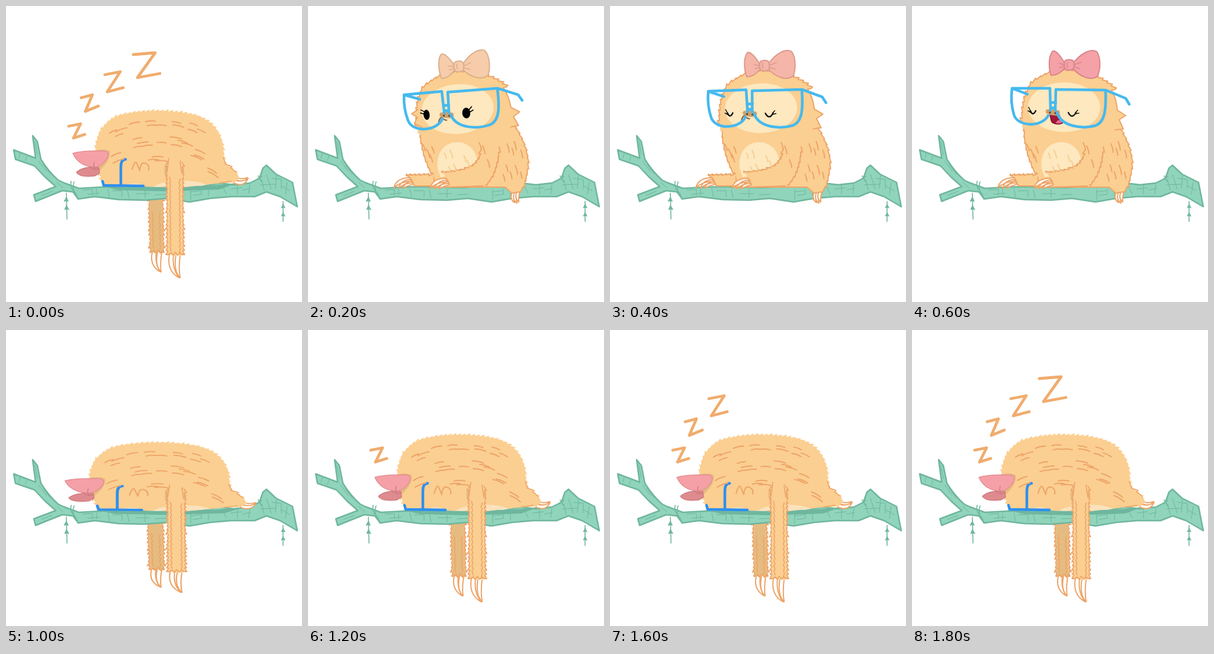
Write an HTML page that moves like this. It is 500 px wide and 500 px high and loops after 2000 ms.

```html
<!DOCTYPE html>
<html lang="en">
<head>
<meta charset="utf-8">
<title>Sleepy sloth</title>
<style>
html, body { margin: 0; width: 100%; height: 100%; overflow: hidden; background: #fff; }
svg { display: block; width: 100vw; height: 100vh; }
</style>
</head>
<body>
<svg id="stage" viewBox="0 0 500 500" stroke-linecap="round" stroke-linejoin="round"></svg>
<script>
const FUR = '#fbcf91', LINE = '#eda468', PALE = '#fde8bf', SHADE = '#e6bb80';
const GREEN = '#8fd4bb', MOSS = '#6fb69e', BLUE = '#45b9ee';

const path = (d, fill = 'none', stroke = 'none', width = 2) =>
  `<path d="${d}" fill="${fill}" stroke="${stroke}" stroke-width="${width}"/>`;
const group = (content, transform) => `<g transform="${transform}">${content}</g>`;
const noise = i => Math.abs(Math.sin(i * 12.9898) * 43758.5453) % 1;

// Turns a smooth path into a furry edge; hair leans along the path.
function fuzz(d, step, size) {
  const curve = document.createElementNS('http://www.w3.org/2000/svg', 'path');
  curve.setAttribute('d', d);
  const count = Math.round(curve.getTotalLength() / step);
  const at = i => curve.getPointAtLength(curve.getTotalLength() * i / count);
  let p = at(0), out = `M${p.x} ${p.y}`;
  for (let i = 1; i <= count; i++) {
    const q = at(i), dx = q.x - p.x, dy = q.y - p.y, len = Math.hypot(dx, dy) || 1;
    const h = size * (.5 + noise(i) * .7) / len;
    out += `L${(q.x + dy * h).toFixed(1)} ${(q.y - dx * h).toFixed(1)}L${q.x.toFixed(1)} ${q.y.toFixed(1)}`;
    p = q;
  }
  return out;
}

// Short strokes centred on "x,y" points, with angle (degrees) given by a rule.
const hairs = (points, length, angle, color = LINE) => path(points.split(' ').map((pair, i) => {
  const [x, y] = pair.split(',').map(Number), a = angle(x, y) * Math.PI / 180;
  const l = length * (.8 + noise(i) * .4), dx = Math.cos(a) * l, dy = Math.sin(a) * l;
  return `M${x - dx / 2} ${y - dy / 2}q${dx / 2 + dy * .1} ${dy / 2 - dx * .1} ${dx} ${dy}`;
}).join(''), 'none', color);

const claw = (x, y, dx, dy, w = 7) => path(
  `M${x} ${y}Q${x - 5} ${y + dy * .7} ${x + dx} ${y + dy}Q${x + w - 3} ${y + dy * .6} ${x + w} ${y}`, '#fff', LINE);

// Hanging arm: straight core, furry sides, two claws.
function arm(x1, y1, x2, y2, w, fill, reach) {
  const side = (o, size) => path(fuzz(`M${x1 + o} ${y1}L${x2 + o} ${y2}`, 7, size), fill, LINE, 1.8);
  let marks = '';
  for (let y = y1 + 25, i = 0; y < y2 - 6; y += 9, i++) {
    const x = x1 + (x2 - x1) * (y - y1) / (y2 - y1);
    marks += `M${x + 3} ${y}l2 8M${x + w - 3} ${y + 3}l-2 8`;
  }
  return claw(x2 + 2, y2, reach * .42, reach) + claw(x2 + w * .55, y2, reach * .18, reach) +
    side(0, -4) + side(w, 4) +
    path(`M${x1} ${y1}L${x1 + w} ${y1}L${x2 + w} ${y2}l-4 3-4-4-4 4-4-3L${x2} ${y2}Z`, fill) +
    path(`M${x2} ${y2}l5-3 3 4 4-5 4 5 4-4L${x2 + w} ${y2}`, 'none', LINE, 1.8) +
    path(marks, 'none', LINE, 1.6);
}

const branch =
  path('M13 243L50 257 45 219 53 229 59 259Q72 280 88 294L96 298 123 308 160 306 192 305 260 307 300 304 330 305 360 299 385 302 412 299 428 291 434 274 440 269 456 284 484 298 492 339 463 322 440 314 420 322 380 322 345 325 310 331 270 325 235 328 190 327 150 322 122 326 113 314 95 312 50 330 47 319 84 305 66 289 48 270 16 259Z', GREEN, MOSS, 2.5) +
  path('M24 249l-2 8M35 254l-2 7M49 229l4 22M55 262l13 17M63 268l12 16M60 320l18-7M86 298l10 9M130 311l16-1v9M138 318l20-2M153 309v10M172 309l3 14M180 312h16v10M205 311l3 13M220 317h22M235 310v14M252 319l18-1M312 310v17M316 320l14-2v-9M328 312l-16 2M342 311v10M366 305l6 12M380 309l18-2M391 303v15M400 311l13-3M412 302l-2 15M432 294l4 17M440 285l8 24M449 291l16 2v16M457 286l-2 22M466 304l14 8M475 298l-3 20M430 302l26-1', 'none', MOSS, 1) +
  path('M102 316l1 44M468 330v34M110 296q-2 10 4 16t7 14M115 297q-3 9 0 18M426 287l6 10M432 288l-7 4', 'none', MOSS, 1.6) +
  path('M102 323l-4 7 4-1 3 1ZM102 337l-3 7 4-1 3 1ZM468 335l-3 6 3-1 3 1ZM468 349l-3 6 3-1 3 1Z', MOSS, MOSS, 1);

const paw = (x, y) => group(
  path('M28 0Q4 0 0 17Q10 7 29 6ZM30 3Q12 3 8 18Q17 9 31 9ZM31 6Q20 6 15 18Q24 13 33 11Z', '#fff', LINE), `translate(${x} ${y})`);

function bow(color, edge) {
  return path('M258 97C250 82 241 73 237 77C230 86 231 108 235 117C245 118 252 111 258 105ZM272 97C284 81 301 71 312 77C320 88 318 110 313 119C301 127 284 119 272 106Z', color, edge) +
    path('M259 92Q265 89 272 92Q276 99 272 107Q265 110 259 107Q255 99 259 92Z', color, edge) +
    path('M248 97l9 2M249 104l8-2M274 99l12-4M274 103l10 3M263 95q-2 5 0 9', 'none', edge, 1.5);
}

const openEyes = '<ellipse cx="204" cy="176" rx="5.2" ry="8.5"/><ellipse cx="271" cy="179" rx="6.8" ry="9"/>' +
  path('M200 170l-5-3M199 174l-5-2M276 174l5-5M277 178l6-3', 'none', '#000', 1.6);
const shutEyes = path('M200 177Q204 187 209 177M264 180Q270 192 277 180', 'none', '#111', 2.4) +
  path('M200 177l-3-6M201 180l-5-3M276 182l6-1M276 180l4-4', 'none', '#111', 1.5);
const quietMouth = path('M223 194Q223 185 229 182Q232 188 237 188', 'none', '#8a5a3c');
const yawn = path('M233 184Q241 180 248 182Q250 190 257 195Q252 201 243 199Q236 198 235 193Z', '#a3163a', '#7c1730', 1.5) +
  path('M243 198Q245 190 255 194Q252 200 243 198Z', '#e4688c');

// Head in its upright place; x and y move the middle of the glasses' top bar.
function head({ x, y, turn, eyes, mouth, ribbon, edge, tuft }) {
  const outline = fuzz('M186 198Q187 150 203 130Q226 110 262 109Q312 111 343 141', 9, 3.5) +
    'L337 142Q345 155 347 176L361 185 350 192 357 208 343 209';
  return group(
    path(outline, FUR, LINE) + path('M186 205Q250 245 345 208L330 160 196 160Z', FUR) +
    (tuft ? path('M190 166L179 172 188 179 182 189 194 196', FUR, LINE) : '') +
    '<ellipse cx="257" cy="171" rx="61" ry="42" fill="' + PALE + '"/>' +
    bow(ribbon, edge) + eyes + mouth +
    path('M227 175Q238 172 249 177Q251 182 247 185Q237 186 228 182Q224 179 227 175Z', '#cda06c') +
    '<circle cx="233" cy="180" r="1.7" fill="#543"/><circle cx="242" cy="181" r="1.7" fill="#543"/>' +
    path('M195 149L169 139H233L234 176M169 139Q166 163 172 183C178 205 220 205 230 185M234 163H243M234 172H242M242 176L243 141 327 142C328 175 326 196 310 202C288 208 252 204 245 180M327 142L361 156 367 166', 'none', BLUE, 4.5),
    `translate(${x} ${y}) rotate(${turn}) translate(-248 -140.5)`);
}

function sitting(face) {
  return branch + claw(345, 314, 4, 18, 5) + claw(349, 314, 4, 19, 5) + claw(353, 313, 3, 18, 5) +
    path(fuzz('M213 292Q186 250 188 190', 11, -2) + 'L340 190' + fuzz('M340 190Q374 238 371 272Q368 300 358 314', 10, 2.5).replace('M', 'L') + 'L344 316 333 306 210 306Z', FUR, LINE) +
    path('M219 275C212 218 284 216 286 265L240 286 224 289Z', PALE) +
    head(face) +
    path(fuzz('M212 283L166 284', 8, 3) + 'L174 293 180 304 212 304', FUR, LINE) + paw(145, 290) +
    path(fuzz('M293 238Q292 262 276 272Q250 284 226 281', 8, -3) + 'L236 292 237 306 296 305Q313 296 323 238', FUR) +
    path(fuzz('M293 242Q292 262 276 272Q250 282 226 281', 8, -3) + 'M237 306L296 304', 'none', LINE) +
    path(fuzz('M323 238Q319 284 300 302', 9, 2.5), 'none', LINE) + paw(206, 291) +
    hairs('196,239 203,249 211,243 208,257 291,237 297,243 338,240 346,246 350,236 361,250 336,274 343,286 352,277 360,286 331,290 305,266', 14, x => 72 + (x - 270) * .05) +
    hairs('232,253 242,250 239,276 248,273 265,258 271,267', 12, () => 72, '#f6cf93');
}

function leaning(face) {
  return arm(219, 290, 220, 353, 21, FUR, 28) + branch +
    path(fuzz('M240 307Q190 268 178 220', 11, -2) + 'L325 180' + fuzz('M325 180Q376 240 371 282Q370 296 364 306', 10, 2.5).replace('M', 'L') + 'L340 305Z', FUR, LINE) +
    path('M233 300C220 270 240 246 272 249C310 252 328 280 327 303L250 308Z', PALE) +
    path('M360 306Q366 322 384 318Q373 315 369 304ZM365 305Q372 319 384 317Q377 311 373 304Z', '#fff', LINE) +
    head(face) +
    arm(283, 222, 281, 353, 22, FUR, 31) + path('M281 220L306 220 300 236 288 236Z', FUR) +
    hairs('190,236 196,244 204,240 208,254 217,250 218,264 318,232 327,240 335,213 345,222 336,249 346,258 355,242 362,264 338,278 350,286 320,292', 14, () => 57) +
    hairs('246,270 256,266 262,282 318,283 312,271', 12, () => 57, '#f6cf93');
}

const sleeping = (transform = 'translate(0 0)') =>
  group(arm(243, 322, 245, 416, 20, SHADE, 33), transform) + branch + group(
    path('M160 304Q270 313 390 299L360 310 270 313 190 311Z', MOSS) +
    path('M385 299Q402 307 409 291Q399 299 386 293ZM386 294Q402 299 408 290Q396 294 390 289Z', '#fff', LINE) +
    path(fuzz('M163 297Q150 266 152 238Q156 198 192 185Q250 171 318 184Q368 200 367 252L370 266 390 281', 8, 3.5) + 'L394 291 386 298 355 300 300 306 166 304Z', FUR) +
    path('M367 256l4 11M370 267l12 4-3 2 10 8M360 299l20-3', 'none', LINE, 1.6) +
    path('M151 244Q166 240 175 245Q178 260 158 278L156 290Z', SHADE) +
    path('M198 304Q216 295 234 304ZM250 305C262 293 325 292 338 302L300 306Z', '#fbe2bd') +
    path('M150 272Q128 272 119 281Q124 290 150 287L158 282 157 273Z', '#de8b8f', '#d07b80', 1.5) +
    path('M113 249Q128 244 168 245Q175 247 172 255Q164 271 149 272Q123 271 113 249Z', '#f5a0a6', '#e38e93', 1.5) +
    path('M149 264q-2 7 1 11M141 271q8 8 16 4', 'none', '#ce7a80', 1.5) +
    path('M163 296L165 303 232 304M202 259Q194 259 194 272L194 303', 'none', '#2f8fee', 4.5) +
    path('M213 276Q217 262 220 264Q222 268 226 278Q227 265 233 265Q243 267 241 277', 'none', LINE) +
    hairs('181,212 195,209 191,218 217,198 244,195 247,202 262,202 222,224 231,231 239,236 223,238 288,197 291,203 317,200 330,211 315,211 287,223 298,229 288,236 263,231 306,234 328,246 326,255 186,251 190,262 256,255 249,260 262,262 321,256 348,278 350,285', 17, x => (x - 255) * .33) +
    path('M276 258Q262 274 271 292L298 294Q306 275 293 258Z', SHADE) +
    arm(273, 264, 274, 420, 24, FUR, 39) + path('M272 284L276 254 293 255 299 290Z', FUR) +
    path('M275 257l-3 24M294 263l3 20', 'none', LINE, 1.6), transform);

const letters = ['M106 203L126 199 114 223 133 217', 'M127 155L146 150 134 178 156 169',
  'M167 116L193 111 171 145 198 138', 'M215 82L252 79 222 121 260 114'];
const asleep = count => sleeping() +
  letters.slice(0, count).map(d => path(d, 'none', '#f0ac6e', 4.8)).join('');

const awake = { x: 241, y: 144.5, turn: -5.1, eyes: openEyes, mouth: quietMouth, ribbon: '#f6ccaa', edge: '#dcae8b', tuft: true };
const drowsy = { x: 245, y: 142.5, turn: -2.2, eyes: shutEyes, mouth: quietMouth, ribbon: '#f5b5a8', edge: '#db9a8c' };
const yawning = { x: 248, y: 140.5, turn: 0, eyes: shutEyes, mouth: yawn, ribbon: '#f4a1a7', edge: '#d9858b' };
const nodding = { x: 219, y: 163, turn: -20.7, eyes: shutEyes, mouth: yawn, ribbon: '#dda99d', edge: '#c58983', tuft: true };

const scenes = [
  asleep(4), sitting(awake), sitting(drowsy), sitting(yawning), leaning(nodding),
  sleeping('matrix(1.09 0 0 .898 -23.5 31.1)'), asleep(1), asleep(2), asleep(3), asleep(4)
];

const stage = document.getElementById('stage');
let shown = -1;
function draw() {
  const step = Math.floor(performance.now() % 2000 / 200);
  if (step !== shown) stage.innerHTML = scenes[shown = step];
  requestAnimationFrame(draw);
}
draw();
</script>
</body>
</html>
```
